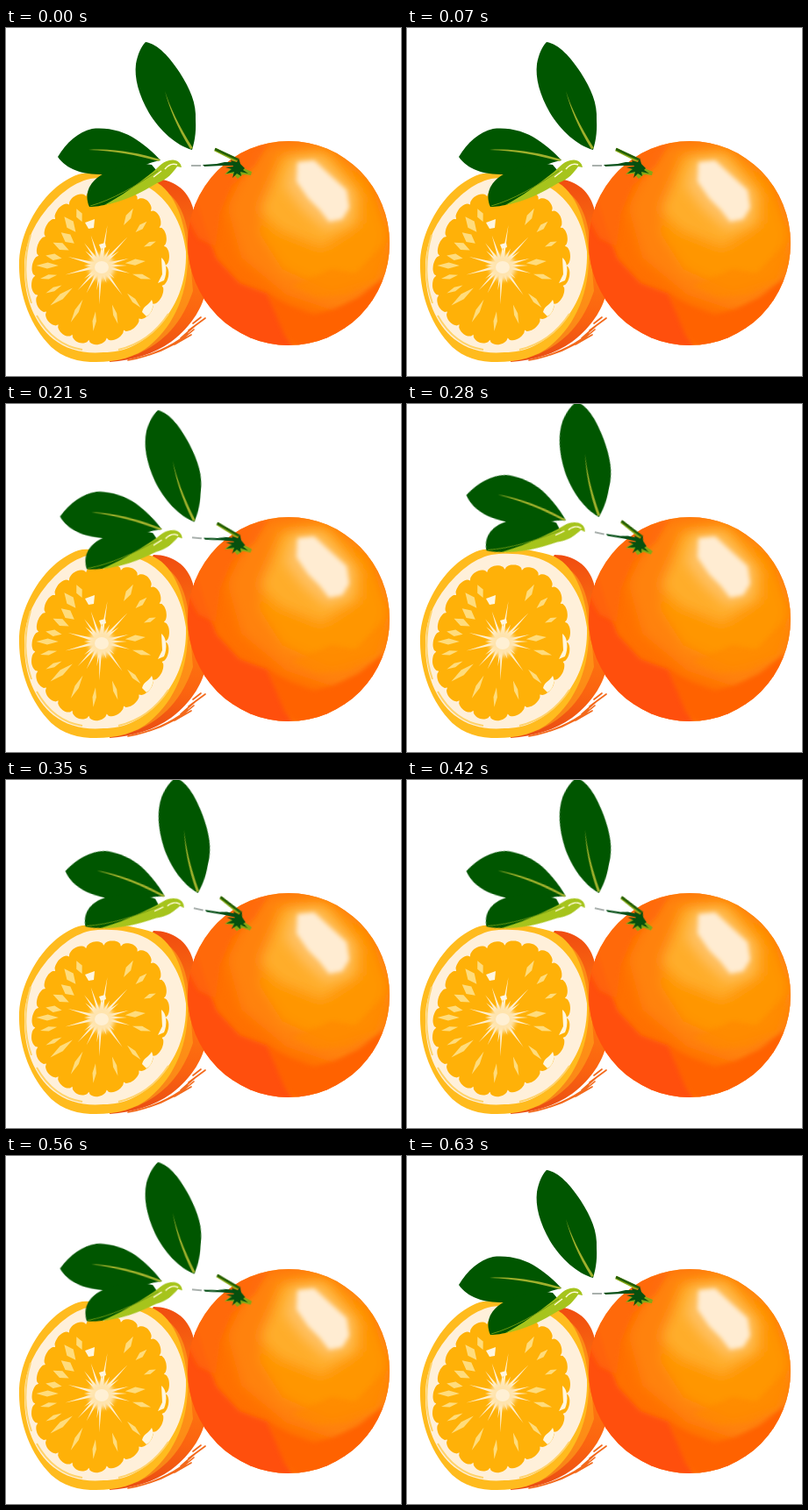
Recreate the animation shown at these times as an HTML page. Size 450 by 397 pixels, loop 0.7 s.

```html
<!DOCTYPE html>
<html lang="en">
<head>
<meta charset="utf-8">
<title>Oranges</title>
<style>
html, body { margin: 0; width: 100%; height: 100%; overflow: hidden; background: #fff; }
svg { display: block; width: 450px; height: 397px; }
#sprig { transform-origin: 262px 165px; }
</style>
</head>
<body>
<svg viewBox="0 0 450 397" xmlns="http://www.w3.org/2000/svg">
  <defs>
    <clipPath id="ball"><ellipse cx="322" cy="245.5" rx="115" ry="116.5"/></clipPath>
    <filter id="soft" x="-30%" y="-30%" width="160%" height="160%"><feGaussianBlur stdDeviation="7"/></filter>
    <filter id="edge" x="-30%" y="-30%" width="160%" height="160%"><feGaussianBlur stdDeviation="2.5"/></filter>
    <linearGradient id="skin" x1="0" y1="0" x2="0" y2="1">
      <stop offset="0" stop-color="#f04c10"/><stop offset=".45" stop-color="#ff7a10"/>
      <stop offset=".75" stop-color="#fb6410"/><stop offset="1" stop-color="#e84c14"/>
    </linearGradient>
  </defs>

  <!-- cut half -->
  <path fill="url(#skin)" d="M168 172C190 172 207 184 213 205L216 255 226 306C221 325 206 345 188 358C168 372 145 379 118 381L150 200Z"/>
  <path fill="#ffab1c" d="M176 184C194 190 205 212 208 240L213 300C200 338 180 358 150 372L120 379 195 300Z" opacity=".55"/>
  <path fill="#ffbb1e" d="M95 166C82 164 70 172 58 181C34 201 17 234 15 265C14 300 25 334 47 359C58 372 75 380 96 381C122 382 147 377 164 362C193 338 208 300 207 258C204 222 194 187 168 174C145 166 118 163 95 166Z"/>
  <path fill="#fff0da" d="M96 172C74 177 58 193 46 207C28 229 20 252 21 276C21 307 32 337 54 355C69 367 89 372 111 370C136 370 155 360 172 342C194 320 206 290 205 255C201 222 185 195 161 181C143 171 116 169 96 172Z"/>
  <path fill="none" stroke="#ffd36a" stroke-width="2" d="M28 236C21 260 20 288 29 314M35 328C49 353 68 364 87 367M128 367C153 361 172 346 185 326"/>
  <path id="flesh" fill="#ffb108"/>
  <path id="streaks" fill="#ffdc7c"/>
  <path id="rays" fill="#fff0cf"/>
  <circle cx="109" cy="273" r="15" fill="#ffe4ae" filter="url(#edge)"/>
  <ellipse cx="109" cy="273" rx="8" ry="7" fill="#fff0d4"/>
  <g fill="#fff6df">
    <path d="M155 324C157 316 162 317 166 310C169 316 167 325 160 329Z"/>
    <path d="M177 262C183 266 184 279 180 288L173 291 178 281Z"/>
    <path d="M106 247L113 245 114 250 108 252Z"/>
    <path d="M90 222L101 218 100 228 94 229Z"/>
  </g>
  <g fill="none" stroke="#f36a1c" stroke-width="1.7" stroke-linecap="round">
    <path d="M139 379C166 374 188 364 207 349M163 373C183 367 200 357 214 344M192 361L211 350M199 354L216 339M208 345L227 331M213 337L222 330"/>
  </g>

  <!-- whole fruit -->
  <g clip-path="url(#ball)">
    <rect x="200" y="120" width="250" height="250" fill="#ff7000"/>
    <g filter="url(#soft)">
      <path fill="#ff8208" d="M285 135L350 122 410 155 445 220 440 290 390 328 320 305 268 262 252 205Z"/>
      <path fill="#ff9600" d="M310 145L365 137 412 175 435 235 420 285 370 300 315 275 288 232Z"/>
      <path fill="#ffad2c" d="M316 147L366 145 402 192 402 222 360 249 312 230 290 208Z"/>
    </g>
    <path fill="#ff5010" filter="url(#edge)" d="M200 190L217 197 229 233 240 263 266 291 298 303 313 324 328 370 240 370 200 290Z"/>
    <path fill="#ff6200" filter="url(#edge)" d="M298 304L326 318 350 327 373 321 402 307 430 285 420 340 340 370 318 352Z"/>
    <path fill="#ff6808" filter="url(#edge)" d="M203 210L225 160 260 142 300 130 284 157 257 180 244 211 239 250 219 240Z" opacity=".8"/>
    <path fill="#ff8800" filter="url(#edge)" d="M340 288L371 275 398 280 427 250 437 261 421 289 389 304 354 307 326 294Z" opacity=".75"/>
    <path fill="#ffc164" filter="url(#soft)" d="M327 150L357 147 396 187 392 221 364 230 338 207 318 181Z"/>
    <path fill="#ffecd2" filter="url(#edge)" d="M332 153L351 151 366 165 388 185 391 205 383 218 368 221 357 207 344 194 331 175Z"/>
  </g>

  <!-- leaves and stalk -->
  <g id="sprig">
    <g fill="#005600">
      <path d="M159 16C173 18 187 34 198 51C210 70 217 86 216 105C217 121 214 132 212 139C194 134 175 117 163 97C151 76 146 57 148 41C150 30 154 21 159 16Z"/>
      <path d="M59 147C69 130 82 119 98 115C116 113 135 118 148 127C160 135 169 143 176 151C165 153 158 156 149 161L115 167C91 168 70 163 59 147Z"/>
      <path d="M95 204C89 190 94 177 108 168C125 157 149 153 166 156L171 162C157 179 138 192 119 200C109 203 101 204 95 204Z"/>
    </g>
    <path fill="#a6c41c" d="M112 202C131 192 150 178 165 166C173 160 177 153 186 151C194 149 199 153 200 159L195 158C190 165 184 173 172 177C154 188 134 198 112 202Z"/>
    <path fill="none" stroke="#fffbd8" stroke-width="1.5" d="M181 161C185 156 190 154 195 156M168 170L177 163"/>
    <path fill="none" stroke="#6c9810" stroke-width="1" d="M96 203C121 196 147 181 173 163"/>
    <path fill="#a0b02c" d="M181 72C186 88 197 112 213 137L210 138C195 114 186 91 181 72ZM94 139C124 137 151 143 176 150L174 152C149 145 123 140 94 139Z"/>
    <path fill="none" stroke="#53605a" stroke-width="1" d="M211 157L222 157"/>
    <path fill="#075018" d="M224 156L240 155 249 153 261 153 262 157 246 157 226 158Z"/>
    <path fill="none" stroke="#8aac17" stroke-width="4" d="M238 138.500L263 151"/>
    <path fill="none" stroke="#245f05" stroke-width="2.5" d="M238 138L264 150"/>
    <path fill="#86a815" d="M249 167L257 159 266 158 280 164 279 168 270 167 264 172 258 166Z"/>
    <path fill="#06500e" d="M256 151L263 153 265 148 267 155 272 160 270 162 276 166 267 164 268 169 263 166 258 171 260 164 251 166 257 161 250 159 259 158Z"/>
  </g>
</svg>
<script>
const el = id => document.getElementById(id);
const cx = 108, cy = 271;
const at = (angle, r) => {
  const y = 90 * r * Math.sin(angle);
  return [cx + 79 * r * Math.cos(angle) - 0.1 * y, cy + y];
};
const path = points => "M" + points.map(p => p.map(n => n.toFixed(1)).join(" ")).join("L") + "Z";

// Rounded lobes around the pulp.
const lobes = 23;
el("flesh").setAttribute("d", path(Array.from({ length: 276 }, (_, i) => {
  const a = i / 276 * 2 * Math.PI;
  const bump = Math.sqrt(Math.abs(Math.sin(a * lobes / 2)));
  return at(a, 0.93 + 0.06 * bump + 0.015 * Math.sin(5 * a));
})));

// A sliver between two radii, widest along its middle.
const sliver = (a, from, to, width) => path([
  at(a, from), at(a + width, (from + to) / 2), at(a, to), at(a - width, (from + to) / 2)
]);

const rays = Array.from({ length: 22 }, (_, i) => {
  const a = i / 22 * 2 * Math.PI + 0.08 * Math.sin(i * 4);
  const reach = 0.38 + 0.14 * Math.sin(i * 2.7);
  return path([at(a - 0.22, 0.09), at(a, reach), at(a + 0.22, 0.09)]);
});
el("rays").setAttribute("d", rays.join(""));

// angle in degrees, inner radius, outer radius, half width
const marks = [
  [-158, .52, .78, .07], [-146, .50, .75, .09], [-134, .59, .86, .08],
  [-121, .65, .84, .06], [-62, .58, .82, .06], [-43, .62, .82, .05],
  [-5, .35, .64, .08], [13, .48, .76, .05], [40, .55, .83, .04],
  [66, .54, .81, .04], [91, .58, .83, .04], [116, .48, .80, .05],
  [143, .47, .84, .06], [155, .59, .83, .04], [180, .61, .93, .05],
  [169, .63, .87, .04], [-171, .58, .82, .06], [-22, .64, .82, .04]
];
el("streaks").setAttribute("d", marks.map(([deg, ...m]) => sliver(deg * Math.PI / 180, ...m)).join(""));

// The sprig holds each pose, then snaps to the next.
const poses = [[0, 0], [140, 5.3], [280, 12.4], [490, 5.3], [630, 0], [700, 0]];
const sway = el("sprig").animate(
  poses.map(([ms, deg]) => ({ offset: ms / 700, transform: `rotate(${deg}deg)`, easing: "step-end" })),
  { duration: 700, iterations: Infinity }
);
sway.startTime = 0;
</script>
</body>
</html>
```
